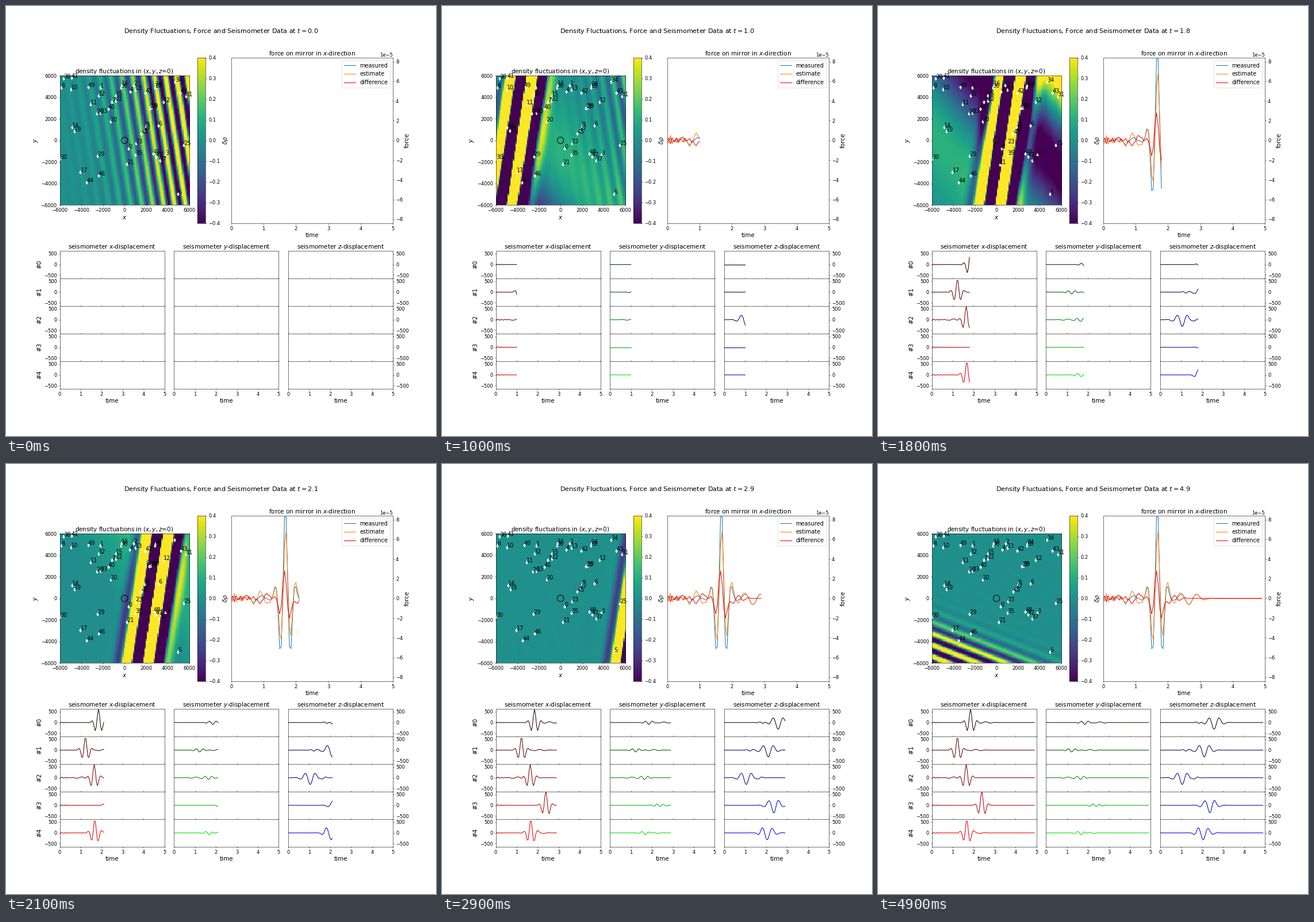
Write a matplotlib script that moves like this. It is 748 px wide and 748 px high and loops after 5 s.

```python
import numpy as np
import matplotlib.pyplot as plt
from matplotlib.animation import FuncAnimation

FRAMES, INTERVAL = 50, 100
SIZE, DPI = 748, 50
LABEL, TICK = 15, 12
SPEED = 6000          # wave speed
EXTENT = 6000         # half width of the map
P_TIME = 1.675        # main pulse reaches the mirror
TAU = 2 * np.pi

plt.rcParams.update({
    "font.family": "DejaVu Sans", "font.size": 10,
    "axes.titlesize": LABEL, "axes.labelsize": LABEL,
    "xtick.labelsize": TICK, "ytick.labelsize": TICK,
})


def place_sensors(total=50):
    """A few fixed sensors, the rest scattered and denser towards the top."""
    fixed = [(370, -760), (-2240, 4890), (850, 5100), (3780, -1350), (500, 4510),
             (4950, -4970), (3140, 1370), (-1180, 3560), (-5870, 4890), (1960, 1320)]
    u, v = np.random.default_rng(3).random((2, total - len(fixed)))
    scattered = np.column_stack([u, v**.6]) * 2 * EXTENT - EXTENT
    return np.vstack([fixed, scattered])


def packet(d, freq, width, phase=0):
    return np.cos(TAU * freq * d + phase) * np.exp(-d**2 / (2 * width**2))


def main_delay(x, y, t):
    return (.988 * x - .154 * y) / SPEED - (t - P_TIME)


def density(x, y, t):
    early = (.988 * x + .154 * y - 7400) / SPEED - t
    late = (.37 * x + .93 * y + 7000) / SPEED - (t - 4.9)
    broad = t - 1.4 - (.765 * x + .644 * y + 2500) / 30000
    return (5.7 * packet(main_delay(x, y, t), 3, .16, -TAU / 4)
            + .65 * packet(early, 6, .755, .8 * TAU)
            + .75 * packet(late, 6, .283, 1.6)
            + .7 * packet(broad, 2, .25))


def moved_sensors(t):
    x, y = SENSORS.T
    shift = packet(main_delay(x, y, t), 3, .16)
    return np.column_stack([x + 160 * shift, y - 25 * shift])


SENSORS = place_sensors()

# sampled signals
time = np.arange(0, 4.951, .05)
ripple = np.sin(TAU * time / .17 - 2) * np.exp(-time / .55)
measured = (9.4 * packet(time - P_TIME, 3, .16)
            - .65 * packet(time - 2.65, 2, .27)
            - .4 * packet(time - .7, 2, .25) + .2 * ripple)
difference = (2.9 * packet(time - 1.65, 3, .14)
              - .6 * packet(time - 1.9, 0, .12)
              + .6 * packet(time - 1, 2, .17, -TAU / 4)
              + .35 * packet(time - 2.2, 3, .17)
              + .4 * np.sin(TAU * time / .13) * np.exp(-time / .8))
forces = [measured, measured - difference, difference]


def displacement(fast, slow, noise):
    p = packet(time - fast, 3, .16)
    s = -320 * packet(time - slow, 2, .27)
    return [615 * p - .12 * s + noise * ripple,
            -90 * packet(time - fast, 3, .2) - .1 * s,
            s - 45 * p]


# arrival of fast and slow pulse, early noise
ROWS = [displacement(*row) for row in (
    (1.85, 2.57, 20), (1.225, 2.1, 8), (1.645, 1.05, 35),
    (2.39, 2.36, 35), (1.675, 2.05, 30))]

fig = plt.figure(figsize=(SIZE / DPI, SIZE / DPI), dpi=DPI)
grid = fig.add_gridspec(12, 6, hspace=0, wspace=.2)
heading = fig.suptitle("", fontsize=16, y=.95)

# density map
ax_map = fig.add_subplot(grid[:6, :3])
centres = (np.arange(100) + .5) / 100 * 2 * EXTENT - EXTENT
mesh_x, mesh_y = np.meshgrid(centres, centres)
image = ax_map.imshow(density(mesh_x, mesh_y, 0), origin="lower", cmap="viridis",
                      vmin=-.4, vmax=.4, interpolation="nearest",
                      extent=(-EXTENT, EXTENT, -EXTENT, EXTENT))
bar = fig.colorbar(image, ax=ax_map, ticks=np.linspace(-.4, .4, 9))
bar.set_label(r"$\delta\rho$")
markers = ax_map.scatter(*SENSORS.T, marker="d", color="white")
for number, (sx, sy) in enumerate(SENSORS):
    ax_map.text(sx, sy, str(number), fontsize=14)
ax_map.add_patch(plt.Circle((0, 0), 300, fill=False, lw=1.5))
ticks = range(-EXTENT, EXTENT + 1, 2000)
ax_map.set(title="density fluctuations in $(x,y,z$=0)", xlabel="$x$", ylabel="$y$",
           xticks=ticks, yticks=ticks,
           xlim=(-EXTENT, EXTENT), ylim=(-EXTENT, EXTENT))

# force plot
ax_force = fig.add_subplot(grid[:6, 3:])
lines = []
for name, color, values in zip(("measured", "estimate", "difference"),
                               ("C0", "C1", "red"), forces):
    line, = ax_force.plot([], [], color=color, label=name)
    lines.append((line, values * 1e-5))
ax_force.set(title="force on mirror in $x$-direction", xlabel="time", ylabel="force",
             xlim=(0, 5), ylim=(-8.4e-5, 8.4e-5))
ax_force.yaxis.tick_right()
ax_force.yaxis.set_label_position("right")
ax_force.legend(loc="upper right", fontsize=14)

# seismometer plots
for row, signals in enumerate(ROWS):
    for col, (axis, values) in enumerate(zip("xyz", signals)):
        ax = fig.add_subplot(grid[7 + row, 2 * col:2 * col + 2])
        color = [0, 0, 0]
        color[col] = .15 + .18 * row
        line, = ax.plot([], [], color=color)
        lines.append((line, values))
        ax.set(xlim=(0, 5), ylim=(-640, 640), xticks=range(6))
        ax.set_yticks([] if col == 1 else [-500, 0, 500])
        if row == 0:
            ax.set_title(f"seismometer ${axis}$-displacement")
        if row == 4:
            ax.set_xlabel("time")
        else:
            ax.tick_params(axis="x", direction="in", labelbottom=False)
        if col == 0:
            ax.set_ylabel(f"#{row}")
        if col == 2:
            ax.yaxis.tick_right()


def update(frame):
    t = frame / 10
    heading.set_text("Density Fluctuations, Force and Seismometer Data at "
                     f"$t={t:.1f}$")
    image.set_data(density(mesh_x, mesh_y, t))
    markers.set_offsets(moved_sensors(t))
    count = 2 * frame + 1
    for line, values in lines:
        line.set_data(time[:count], values[:count])
    return [heading, image, markers] + [line for line, _ in lines]


animation = FuncAnimation(fig, update, frames=FRAMES, interval=INTERVAL,
                          repeat=True, repeat_delay=0, blit=False)
plt.show()
```
